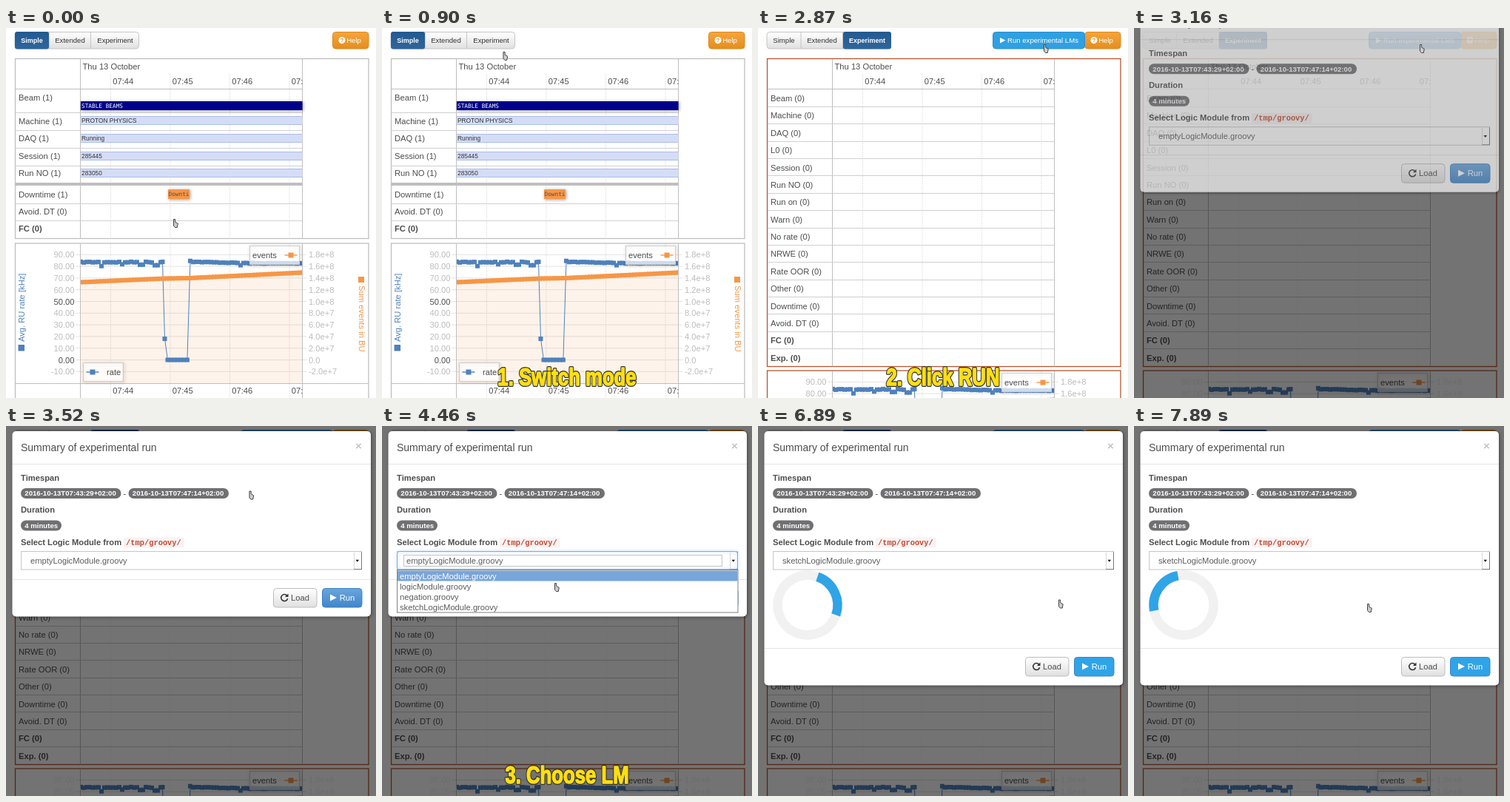
Write an HTML page that moves like this. It is 500 px wide and 500 px high and loops after 7990 ms.

```html
<!DOCTYPE html>
<html lang="en">
<head>
<meta charset="utf-8">
<title>Experimental run walkthrough</title>
<style>
html, body { margin: 0; width: 100%; height: 100%; overflow: hidden; background: #fff; }
svg { display: block; width: 100vw; height: 100vh; }
text { font: 11.2px "Liberation Sans", Arial, sans-serif; fill: #4d4d4d; white-space: pre; }
.b { font-weight: 700; }
.btn { font-size: 9.6px; fill: #333; text-anchor: middle; }
.on { font-size: 9px; font-weight: 700; fill: #fff; text-anchor: middle; }
.sm { font-size: 8.35px; fill: #333; }
.mono { font: 7.75px "DejaVu Sans Mono", monospace; }
.code { font: 700 10.4px "Liberation Mono", monospace; fill: #c64a2c; }
.pill { font-size: 9.6px; font-weight: 700; fill: #fff; }
.pale { fill: #bcbcbc; }
.faint { opacity: var(--faint, 1); }
.end { text-anchor: end; }
.mid { text-anchor: middle; }
.opt { fill: #5c5c5c; }
.w { fill: #fff; }
.cap { font-size: 33px; font-weight: 700; text-anchor: middle; stroke-linejoin: round; }
.shade { filter: drop-shadow(1px 1px 2px rgba(0,0,0,.4)); }
</style>
</head>
<body>
<svg id="stage" viewBox="0 0 500 500"></svg>
<script>
const LOOP = 7990;
const BLUE = '#4f81bd', ORANGE = '#f79646', EDGE = '#bfbfbf', RUST = '#b5562f';
const r1 = v => Math.round(v * 100) / 100;
const txt = (x, y, s, c = '', more = '') => `<text x="${x}" y="${y}" class="${c}" ${more}>${s}</text>`;
const box = (x, y, w, h, fill, more = '') => `<rect x="${x}" y="${y}" width="${w}" height="${h}" fill="${fill}" ${more}/>`;
const line = (x1, y1, x2, y2, c = '#d0d0d0', more = '') =>
  `<path d="M${x1} ${y1}L${x2} ${y2}" stroke="${c}" fill="none" ${more}/>`;
const group = (id, body, more = '') => `<g id="${id}" ${more}>${body}</g>`;
const grad = (id, a, b) => `<linearGradient id="${id}" x2="0" y2="1"><stop stop-color="${a}"/><stop offset="1" stop-color="${b}"/></linearGradient>`;
const play = (x, y, s) => `<path d="M${x} ${y - s / 2}l${s} ${s / 2}l${-s} ${s / 2}z" fill="#fff"/>`;

const TICKS = [141.5, 222, 302.5, 383];
const clock = y => ['07:44', '07:45', '07:46', '07:'].map((s, i) => txt(TICKS[i] + 2.7, y, s)).join('');
const grid = (top, end) => TICKS.map(x => line(x, top, x, end, '#e3e3e3', 'class="faint" stroke-dasharray="2 1"')).join('');

// Toolbar
function modes(active) {
  const tabs = [['Simple', 12, 46], ['Extended', 58, 57], ['Experiment', 115, 65]];
  return box(12, 5.5, 167.5, 22.5, 'url(#grey)', 'rx="4" stroke="#c4c4c4"') +
    line(58, 6, 58, 28, '#c4c4c4') + line(114.5, 6, 114.5, 28, '#c4c4c4') +
    tabs.map(([s, x, w], i) => i == active
      ? box(x, 5, w, 23.5, 'url(#navy)', 'rx="3"') + txt(x + w / 2, 20, s, 'on')
      : txt(x + w / 2, 20, s, 'btn')).join('');
}
const help = box(441.5, 5.5, 48.5, 22.5, 'url(#amber)', 'rx="4" stroke="#dd8a1c"') +
  '<circle cx="454" cy="16.5" r="4.5" fill="#fff"/>' +
  txt(454, 19.4, '?', 'b mid', 'style="font-size:8px;fill:#e58f1c"') + txt(470, 20, 'Help', 'btn w');
const runTop = box(317.5, 5.5, 124, 22.5, '#2fa0e2', 'id="runFace" rx="4" stroke="#2a8fce"') +
  play(327, 16.7, 7.5) + txt(385, 20, 'Run experimental LMs', 'btn w');

// Timeline tables
function frame(bottom, edge) {
  return box(12.5, 41.5, 477.5, bottom - 41.5, '#fff', `stroke="${edge}" stroke-width="1.3"`) +
    grid(62, bottom) + line(100.5, 42, 100.5, bottom, EDGE) + line(400.5, 42, 400.5, bottom, EDGE) +
    line(13, 82.5, 400, 82.5, EDGE) + txt(103.5, 56, 'Thu 13 October') + clock(76);
}
function simpleTable() {
  const rows = [['Beam (1)', 98, 114.5], ['Machine (1)', 130, 138.5], ['DAQ (1)', 153, 162.5], ['Session (1)', 177, 186.5],
    ['Run NO (1)', 200, 0], ['Downtime (1)', 229, 237.5], ['Avoid. DT (0)', 252, 260.5], ['FC (0)', 275, 0]];
  const items = [['PROTON PHYSICS', 119], ['Running', 143], ['285445', 167], ['283050', 190]];
  return frame(284.5, EDGE) +
    rows.map(([s, y, end], i) => txt(17, y, s, i == 7 ? 'b' : '') + (end ? line(13, end, 400, end) : '')).join('') +
    box(13, 209, 388, 4, EDGE) +
    box(101, 99, 299.5, 12, '#00008b', 'class="shade"') + txt(102, 107.6, 'STABLE BEAMS', 'mono w') +
    items.map(([s, y]) => box(101, y, 299.5, 12, '#d5ddf6') + line(101, y + .5, 400, y + .5, '#a9bdf0') +
      line(101, y + 11.5, 400, y + 11.5, '#a9bdf0') + txt(102, y + 9, s, 'sm')).join('') +
    box(219, 218, 29, 13, ORANGE, 'class="shade"') + txt(219.5, 227.3, 'Downti', 'mono');
}
function fullTable() {
  const names = ['Beam', 'Machine', 'DAQ', 'L0', 'Session', 'Run NO', 'Run on', 'Warn', 'No rate', 'NRWE',
    'Rate OOR', 'Other', 'Downtime', 'Avoid. DT', 'FC', 'Exp.'];
  const step = 23.375;
  return frame(457.5, RUST) + names.map((s, i) => {
    const y = Math.floor(83 + i * step) + .5;
    return txt(17, r1(99 + i * step), s + ' (0)', i > 13 ? 'b' : '') + (i ? line(13, y, 400, y) : '');
  }).join('');
}

// Rate and event chart
function chart() {
  let seed = 7;
  const rnd = () => (seed = seed * 16807 % 2147483647) / 2147483647;
  const rate = [];
  const dips = { 129: 5, 157: 3, 181: 3, 185: 3, 201: 4, 205: 4, 317: 5 };
  for (let x = 101; x < 212; x += 4) rate.push([x, 315.8 + rnd() * 1.2 + (dips[x] || 0)]);
  rate.push([211.5, 316], [214.5, 420]);
  for (let x = 218.5; x < 246; x += 4.4) rate.push([x, 448.5]);
  for (let x = 249; x < 402; x += 4) {
    rate.push([x, (x < 250 ? 314 : x > 330 ? 317.5 : 315.5 + (x - 250) / 40) + rnd() * .8 + (dips[x] || 0) * .6]);
  }
  const knots = [[99, 343.6], [212, 338.6], [248, 338], [404, 330.3]];
  const sums = [];
  for (let x = 101; x < 403; x += 4) {
    const k = knots.findIndex(p => p[0] > x), [a, b] = [knots[k - 1], knots[k]];
    sums.push([x, a[1] + (b[1] - a[1]) * (x - a[0]) / (b[0] - a[0])]);
  }
  const path = pts => 'M' + pts.map(p => p.map(r1).join(' ')).join('L');
  const dots = (pts, c) => pts.map(([x, y]) => box(r1(x - 3), r1(y - 3), 6, 6, c)).join('');
  const right = ['1.8e+8', '1.6e+8', '1.4e+8', '1.2e+8', '1.0e+8', '8.0e+7', '6.0e+7', '4.0e+7', '2.0e+7', '0.0', '-2.0e+7'];
  const key = (x, y, c) => line(x - 8.5, y, x + 8.5, y, c, 'stroke-width="1.4"') + box(x - 3.5, y - 3.5, 7, 7, c);
  const legend = (x, y, w) => box(x, y, w, 25, 'none', 'stroke="#b5b5b5" class="shade"') + box(x, y, w, 25, '#fff', 'fill-opacity=".72"');
  return box(12.5, 291, 477.5, 240, '#fff', `id="rim" stroke="${EDGE}" stroke-width="1.3"`) + grid(292, 500) +
    right.map((s, i) => {
      const y = r1(306.3 + i * 15.8), n = 90 - i * 10;
      return line(94, y, 406, y, '#e3e3e3') + txt(92.5, y + 4, n.toFixed(2), n % 50 ? 'end pale faint' : 'end') +
        txt(409, y + 4, s, 'pale faint');
    }).join('') +
    `<g clip-path="url(#plot)"><path d="${path(sums)}V480H101Z" fill="${ORANGE}" opacity=".11"/>` +
    `<path d="${path(rate)}" stroke="${BLUE}" fill="none"/>` + dots(rate, BLUE) + dots(sums, ORANGE) + '</g>' +
    line(100.5, 292, 100.5, 500, EDGE) + line(400.5, 292, 400.5, 500, EDGE) + line(13, 480.5, 490, 480.5, EDGE) + clock(494) +
    legend(329.5, 294.5, 67) + txt(333, 311, 'events') + key(385, 307, ORANGE) +
    legend(105, 452.5, 53) + key(117, 465, BLUE) + txt(136, 469, 'rate') +
    txt(0, 0, 'Avg. RU rate [kHz]', '', `transform="translate(25 424) rotate(-90)" style="fill:${BLUE}"`) + box(16.5, 428, 8.5, 8.5, BLUE) +
    txt(0, 0, 'Sum events in BU', '', `transform="translate(476.5 348) rotate(90)" style="fill:${ORANGE}"`) + box(476, 336, 8, 8, ORANGE);
}

// Dialog
const FILES = ['emptyLogicModule', 'logicModule', 'negation', 'sketchLogicModule'].map(s => s + '.groovy');
const pill = (x, y, w, s) => box(x, y, w, 14, '#706f72', 'rx="7"') + txt(x + 5.3, y + 10.3, s, 'pill');
function dialog() {
  return box(8.5, 7, 484.5, 250.5, '#fff', 'id="sheet" rx="5" class="shade"') +
    txt(20, 33.5, 'Summary of experimental run', '', 'style="font-size:14px"') +
    txt(476.5, 32, '×', 'b mid', 'style="font-size:15px;fill:#c4c4c4"') + line(9, 51.5, 493, 51.5, '#e5e5e5') +
    txt(20, 74, 'Timespan', 'b') + pill(20, 84, 135.5, '2016-10-13T07:43:29+02:00') + txt(158.5, 94.5, '-') +
    pill(165.5, 84, 135.5, '2016-10-13T07:47:14+02:00') +
    txt(20, 117, 'Duration', 'b') + pill(20, 127.5, 55, '4 minutes') +
    txt(20, 161, 'Select Logic Module from', 'b') + box(159, 150.5, 82, 14, '#f9f2f4', 'rx="3"') + txt(162, 160.5, '/tmp/groovy/', 'code') +
    box(20.5, 169.5, 460, 24.5, '#fff', 'stroke="#c6c6c6"') + line(480.5, 170, 480.5, 194, '#777') + line(470, 193.5, 480, 193.5, '#888') +
    group('focus', box(20.5, 169.5, 460, 24.5, 'none', 'rx="3" stroke="#7aaae2" style="filter:drop-shadow(0 0 2px #8fbdf0)"') +
      box(29.5, 174.5, 430, 15, 'none', 'stroke="#888" stroke-dasharray="1 1"')) +
    line(470.5, 171, 470.5, 193, '#d5d5d5') + '<path d="M472.5 180.8h4.6l-2.3 3z" fill="#111"/>' +
    txt(33, 186, FILES[0], 'opt', 'id="pick"') +
    group('wheel', '<circle r="40.5" stroke="#f1f1f1"/><path d="M-28.64 -28.64A40.5 40.5 0 0 1 28.64 -28.64" stroke="#2fa4e7"/>',
      'fill="none" stroke-width="12.5"') +
    group('foot', line(9, 207.5, 493, 207.5, '#e5e5e5') +
      box(361.5, 219.5, 58.5, 25.5, 'url(#grey)', 'rx="4" stroke="#bdbdbd"') +
      '<path d="M380 229.5A4.5 4.5 0 1 0 380.6 233.2" fill="none" stroke="#333" stroke-width="1.6"/><path d="M381.5 226.5v4.6h-4.6z" fill="#333"/>' +
      txt(397.5, 236, 'Load', 'mid') +
      box(427.5, 219.5, 53.5, 25.5, 'url(#blue)', 'id="go" rx="4" stroke="#3d83c4"') + play(438, 232, 9) + txt(461, 236, 'Run', 'mid w')) +
    group('menu', box(20.5, 194.5, 460.5, 57.5, '#fff', 'stroke="#808080"') + box(21, 195.5, 459.5, 14, '#78a5da', 'id="mark"') +
      FILES.map((s, i) => txt(24, 206.7 + i * 14, s, 'opt')).join(''));
}

const svg = document.getElementById('stage');
svg.innerHTML = '<defs>' + grad('grey', '#fff', '#e0e0e0') + grad('navy', '#235a90', '#2e659c') + grad('amber', '#f5a53d', '#e48e1d') +
  grad('blue', '#6aa5dd', '#4186ca') + grad('lit', '#5cb0ea', '#2b96dc') +
  '<clipPath id="plot"><rect x="101" y="292" width="299.5" height="189"/></clipPath></defs>' +
  group('simple', modes(0) + simpleTable()) + group('full', modes(2) + fullTable()) +
  help + group('runTop', runTop) + group('chart', chart()) +
  box(0, 0, 500, 500, '#000', 'id="dim"') + group('dialog', dialog()) +
  `<g transform="translate(250 483) scale(.78 1)">${txt(0, 0, '', 'cap', 'id="capEdge" style="fill:#333;stroke:#333;stroke-width:4.2px"')}` +
  `${txt(0, 0, '', 'cap', 'id="cap" style="fill:#ffdf12;stroke:#ffdf12;stroke-width:1.6px"')}</g>` +
  group('cursor', '<path id="slim" d="M.5 .5V9.3L2.5 11.5H5.3L6.3 6.3L2.7 4.3V.5Z" fill="#ccc" stroke="#444"/>' +
    '<path id="hand" d="M2 6.5V1Q3 -.5 4 1V4.5Q5 3.6 6 4.8Q7 4 8 5.2Q9.5 4.8 9.5 6.5V11H3.5L.3 7Q.6 5.6 2 6.5Z" fill="#fff" stroke="#222"/>');

const $ = id => document.getElementById(id);
const show = (id, on) => $(id).style.display = on ? '' : 'none';

// Rows of [time, value, ...]
const MOVE = [[0, 226, 258], [100, 226, 258], [900, 163.5, 32], [1100, 150, 18], [1350, 150, 18], [1860, 386, 22], [3260, 386, 22],
  [3650, 300, 120], [4180, 238, 183], [4360, 236, 187], [4460, 233, 212], [4760, 231, 244], [5620, 231, 244], [6020, 415, 235],
  [6220, 448, 232], [6660, 448, 232], [7390, 315, 240]];
const SLIDE = [[3030, -62], [3160, -36], [3260, -12], [3360, 0]];
const FADE = [[3030, 0], [3160, .66], [3260, 1]];
const DIM = [[3029, 0], [3030, .1], [3160, .55]];
const CAPS = [[0, ''], [500, '1. Switch mode'], [1760, ''], [1860, '2. Click RUN'], [3030, ''], [4180, '3. Choose LM'],
  [5200, ''], [5620, '4. Run'], [6420, '']];
const MARK = [[0, 0], [4560, 1], [4660, 2], [4760, 3]];

const held = (rows, t) => rows.filter(r => r[0] <= t).pop()[1];
function mix(rows, t, k = 1) {
  const i = rows.findIndex(r => r[0] > t);
  if (i < 0) return rows[rows.length - 1][k];
  if (!i) return rows[0][k];
  const a = rows[i - 1], b = rows[i];
  return a[k] + (b[k] - a[k]) * (t - a[0]) / (b[0] - a[0]);
}

function draw(t) {
  const full = t >= 1200, open = t >= 3030, busy = t >= 6660, grow = busy ? 93 : 0;
  show('simple', !full);
  show('full', full);
  show('runTop', full);
  $('runFace').setAttribute('fill', open ? 'url(#blue)' : '#2fa0e2');
  $('chart').setAttribute('transform', `translate(0 ${full ? 172 : 0})`);
  $('rim').setAttribute('stroke', full ? RUST : EDGE);
  $('dim').setAttribute('opacity', mix(DIM, t));
  svg.style.setProperty('--faint', open ? .25 : 1);

  show('dialog', open);
  $('dialog').setAttribute('transform', `translate(0 ${mix(SLIDE, t)})`);
  $('dialog').setAttribute('opacity', mix(FADE, t));
  $('sheet').setAttribute('height', 250.5 + grow);
  $('foot').setAttribute('transform', `translate(0 ${grow})`);
  show('focus', t >= 4180 && t < 6420);
  show('menu', t >= 4360 && t < 5200);
  const m = held(MARK, t);
  $('mark').setAttribute('y', 195.5 + m * 14);
  document.querySelectorAll('#menu text').forEach((e, i) => e.style.fill = i == m ? '#fff' : '');
  $('pick').textContent = FILES[t >= 5200 ? 3 : 0];
  $('go').setAttribute('fill', busy ? '#2fa4e7' : t >= 6000 ? 'url(#lit)' : 'url(#blue)');
  show('wheel', busy);
  $('wheel').setAttribute('transform', `translate(67 242) rotate(${304 + (t - 7890) * .24})`);

  $('cap').textContent = $('capEdge').textContent = held(CAPS, t);
  const hand = t >= 6000 && t < 6800;
  show('hand', hand);
  show('slim', !hand);
  $('cursor').setAttribute('transform', `translate(${mix(MOVE, t)} ${mix(MOVE, t, 2)})`);
}

const start = performance.now();
function tick() {
  draw((performance.now() - start) % LOOP);
  requestAnimationFrame(tick);
}
tick();
</script>
</body>
</html>
```
